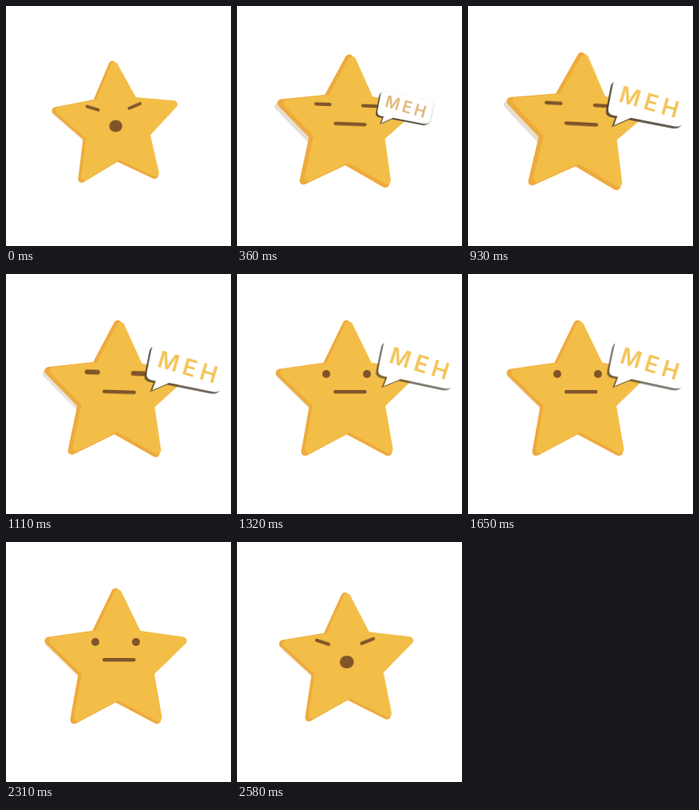
These frames come from a looping animation (282 by 300 pixels, 2.61 s). An HTML page:

```html
<!DOCTYPE html>
<html lang="en">
<head>
<meta charset="utf-8">
<title>Meh star</title>
<style>
html, body { margin: 0; width: 100%; height: 100%; overflow: hidden; background: #fff; }
svg { display: block; width: 100%; height: 100%; }
text { font: 600 28.5px Inter, "Open Sans", sans-serif; letter-spacing: 5.5px; text-anchor: middle; }
</style>
</head>
<body>
<svg viewBox="0 0 282 300">
  <defs>
    <filter id="soft" x="-20%" y="-20%" width="140%" height="140%"><feGaussianBlur stdDeviation="0.7"/></filter>
    <filter id="haze" x="-20%" y="-20%" width="140%" height="140%"><feGaussianBlur stdDeviation="1.5"/></filter>
  </defs>
  <g id="star" stroke-linejoin="round" stroke-linecap="round">
    <path id="edge" fill="none" stroke="#e6dfd1" stroke-width="9"/>
    <path class="body" fill="#eeaa3d" stroke="#eeaa3d" stroke-width="10"/>
    <path class="body" id="front" fill="#f3be47" stroke="#f3be47" stroke-width="10" filter="url(#soft)"/>
    <g fill="#80552a" filter="url(#soft)">
      <rect id="eyeL"/>
      <rect id="eyeR"/>
      <rect id="mouth"/>
    </g>
  </g>
  <g id="bubble">
    <path class="balloon" id="glow" fill="#8d867a" filter="url(#haze)" transform="translate(0 2)"/>
    <path class="balloon" id="shade" fill="#4a4034" transform="translate(-2.5 3)" filter="url(#soft)"/>
    <path class="balloon" fill="#fff"/>
    <text id="word" transform="translate(40.5 -36.5) rotate(5)" y="10" filter="url(#soft)">MEH</text>
  </g>
</svg>
<script>
const LOOP = 2610, STEP = 30;
const $ = id => document.getElementById(id);
const mix = (a, b, k) => a + (b - a) * k;
const part = (t, a, b) => Math.min(1, Math.max(0, (t - a) / (b - a)));
const easeIn = (k, p) => k ** p;
const easeOut = (k, p) => 1 - (1 - k) ** p;
const smooth = k => k * k * (3 - 2 * k);
const ramp = (t, a, b) => smooth(part(t, a, b));

function point(i) {
  const r = i % 2 ? 43.8 : 88.2;
  const a = i * Math.PI / 5;
  return [r * Math.sin(a), -r * Math.cos(a)].map(v => v.toFixed(2)).join(" ");
}
const outline = "M" + Array.from({ length: 10 }, (_, i) => point(i)).join("L") + "Z";
document.querySelectorAll(".body").forEach(p => p.setAttribute("d", outline));
$("edge").setAttribute("d", `M${point(8)}L${point(7)}`);

// The tail tip is the local origin of the bubble
const balloon = "M-3 -57H78Q86 -57 86 -49V-24Q86 -13 74 -13H19L0 0L2 -12H-3Q-11 -12 -11 -20V-49Q-11 -57 -3 -57Z";
document.querySelectorAll(".balloon").forEach(p => p.setAttribute("d", balloon));

function set(el, attrs) {
  for (const name in attrs) el.setAttribute(name, attrs[name]);
}

function pill(id, x, y, a, b, turn = 0) {
  set($(id), {
    x: -a, y: -b, width: 2 * a, height: 2 * b, rx: Math.min(a, b),
    transform: `translate(${x} ${y}) rotate(${turn})`
  });
}

function starPose(t) {
  if (t < 60) {
    const k = easeOut(t / 60, 2);
    return [mix(.885, .86, k), mix(-3, -3.5, k)];
  }
  if (t < 660) {
    const k = easeOut(part(t, 60, 660), 2.3);
    return [mix(.86, 1, k), mix(-3.5, 3.6, k)];
  }
  if (t < 2430) {
    const turn = mix(3.6, 3.2, ramp(t, 660, 930));
    return [1, mix(turn, 0, ramp(t, 930, 1320))];
  }
  const k = easeIn(part(t, 2430, LOOP), 4);
  return [mix(1, .885, k), -3 * k];
}

function drawStar(t) {
  const [size, turn] = starPose(t);
  const tilt = ramp(t, 150, 400) * (1 - ramp(t, 960, 1320));
  const wide = size * mix(1, 1.02, tilt);
  set($("star"), { transform: `translate(137.3 151) rotate(${turn}) scale(${wide} ${size})` });
  set($("front"), {
    transform: `translate(${mix(3, 4, tilt)} ${mix(-1, -1.5, tilt)}) scale(${mix(.97, .96, tilt)})`
  });
  set($("edge"), {
    transform: `translate(${mix(-.5, -4, tilt)} ${mix(2.5, 4.5, tilt)})`,
    opacity: mix(.65, 1, tilt)
  });

  const yawn = 1 - ramp(t, 120, 270) + ramp(t, 2340, 2460);
  const open = ramp(t, 1080, 1170) * (1 - ramp(t, 2340, 2460));
  const a = mix(mix(11, 10.5, yawn), 5, open);
  const b = mix(2.2, 5, open);
  const y = mix(-28, -26, open);
  pill("eyeL", mix(-31, -25.4, open), y, a, b, 20 * yawn);
  pill("eyeR", mix(28.5, 25.6, open), y, a, b, -20 * yawn);
  pill("mouth", mix(4.4, .4, yawn), mix(-3.7, -1, yawn), mix(20.7, 9.3, yawn), mix(2.2, 8.3, yawn));
}

function drawBubble(t) {
  const grow = easeOut(part(t, 120, 660), 2);
  const shrink = easeIn(part(t, 1620, 2010), 1.72);
  const size = grow * (1 - shrink);
  const lift = ramp(t, 930, 1320);
  const x = mix(181, 183, ramp(t, 360, 660)) + lift - 5 * shrink;
  const y = mix(146, 149, ramp(t, 360, 660)) - 9 * lift - shrink;
  set($("bubble"), {
    transform: `translate(${x} ${y}) rotate(${mix(11, 12, lift)}) scale(${size})`,
    visibility: size > .01 ? "visible" : "hidden"
  });
  set($("glow"), { opacity: mix(.6, 0, ramp(t, 690, 900)) });
  set($("shade"), { opacity: mix(.85, .68, lift) * (1 - part(t, 1650, 1900)) });
  const warm = ramp(t, 330, 600);
  set($("word"), {
    fill: `rgb(${mix(222, 243, warm)},${mix(182, 196, warm)},${mix(118, 88, warm)})`,
    opacity: part(size, .28, .45)
  });
}

const start = performance.now();
function frame(now) {
  const t = Math.floor(Math.max(0, now - start) % LOOP / STEP) * STEP;
  drawStar(t);
  drawBubble(t);
  requestAnimationFrame(frame);
}
frame(start);
</script>
</body>
</html>
```
